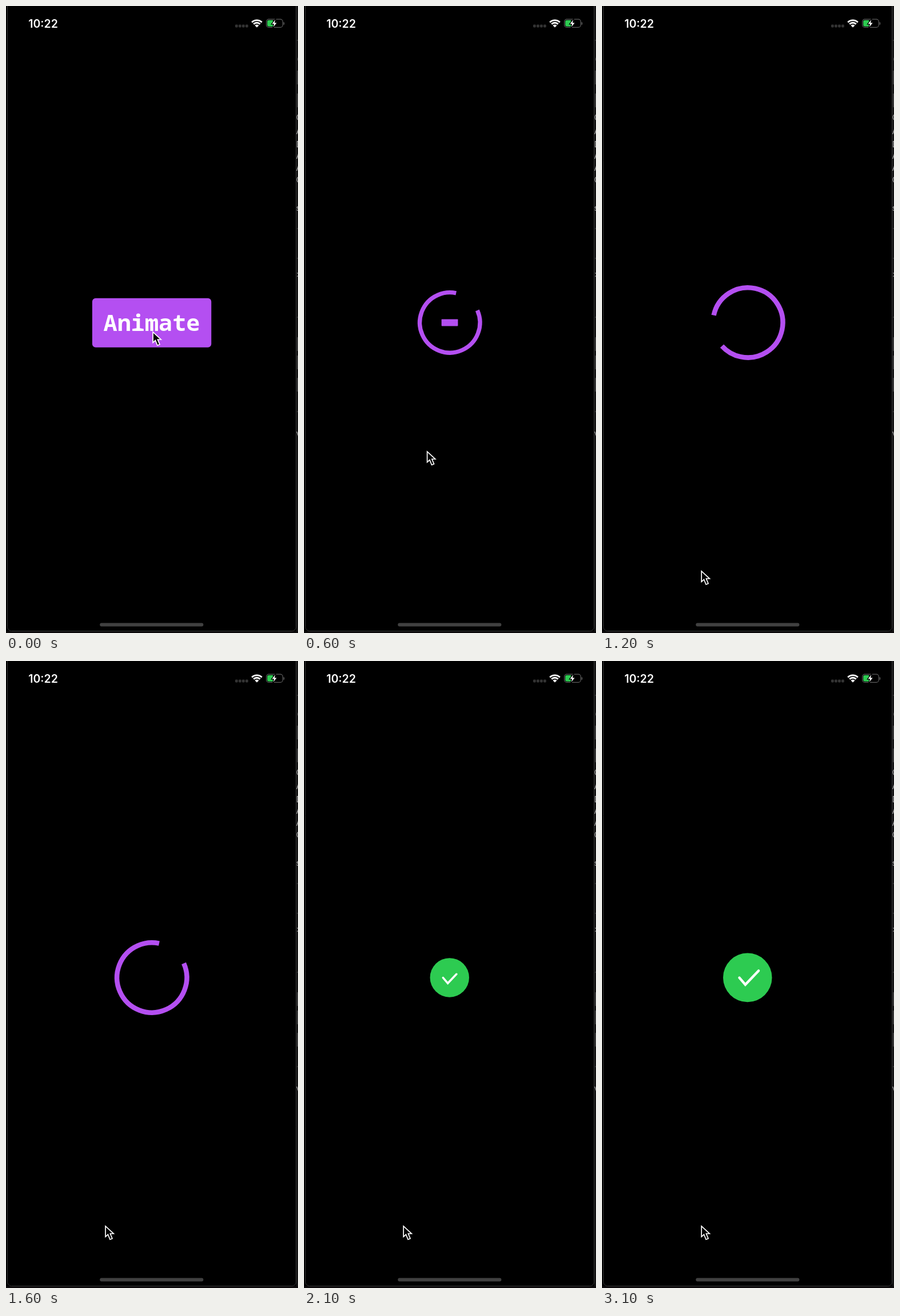
Recreate the animation shown at these times as an HTML page with a canvas. Size 511 by 1096 pixels, loop 3200 ms.

```html
<!DOCTYPE html>
<html lang="en">
<head>
<meta charset="utf-8">
<title>Animated button</title>
<style>
  html, body { margin: 0; width: 100%; height: 100%; overflow: hidden; background: #000; }
  canvas { display: block; }
</style>
</head>
<body>
<canvas id="stage"></canvas>
<script>
const W = 511, H = 1096, LOOP = 3200, TICK = 100;
const TAP = 352, DONE = 1880;
const CX = 255, CY = 553.4;
const PURPLE = '#b44ff1', GREEN = '#2dcb51';

const canvas = document.getElementById('stage');
const dpr = window.devicePixelRatio || 1;
canvas.width = W * dpr;
canvas.height = H * dpr;
canvas.style.width = W + 'px';
canvas.style.height = H + 'px';
const ctx = canvas.getContext('2d');

const clamp = v => Math.max(0, Math.min(1, v));

// Damped spring from 0 to 1 with a slight overshoot.
function spring(ms) {
  if (ms <= 0) return 0;
  const t = ms / 1000, omega = 2 * Math.PI / 0.55, zeta = 0.825;
  const decay = zeta * omega, wd = omega * Math.sqrt(1 - zeta * zeta);
  return 1 - Math.exp(-decay * t) * (Math.cos(wd * t) + decay / wd * Math.sin(wd * t));
}

function roundBox(x, y, w, h, r, fill) {
  ctx.beginPath();
  ctx.roundRect(x, y, w, h, r);
  if (fill) { ctx.fillStyle = fill; ctx.fill(); }
}

function trace(points, close) {
  ctx.beginPath();
  points.forEach(([x, y]) => ctx.lineTo(x, y));
  if (close) ctx.closePath();
}

function scaled(scale, draw) {
  if (scale < 0.003) return;
  ctx.save();
  ctx.translate(CX, CY);
  ctx.scale(scale, scale);
  draw();
  ctx.restore();
}

function drawSideWindow() {
  ctx.fillStyle = '#141414';
  ctx.fillRect(508, 0, 3, H);
  ctx.fillStyle = '#3a3a3a';
  for (const y of [113, 153, 579, 611, 650]) ctx.fillRect(509, y, 2, 24);
  ctx.fillStyle = '#303030';
  for (const y of [59, 388, 440, 543, 708]) ctx.fillRect(509, y, 2, 2);
  ctx.font = '14px Inter, sans-serif';
  ctx.textBaseline = 'alphabetic';
  ctx.textAlign = 'left';
  ctx.fillStyle = '#a8a8a8';
  ctx.fillText('(', 509, 97);
  const marks = [['C', 200], ['A', 224], ['D', 247], ['A', 267],
                 ['A', 288], ['C', 309], ['s', 358], ['>', 474], ['v', 752]];
  for (const [ch, y] of marks) ctx.fillText(ch, 507.7, y);
}

function drawPhone() {
  ctx.fillStyle = '#000';
  ctx.fillRect(0, 0, W, H);
  drawSideWindow();
  ctx.fillStyle = '#0d0b0c';
  ctx.fillRect(0, 1093, W, 3);
  roundBox(2.5, -20, 505, 1112.5, 7, '#000');
  ctx.strokeStyle = '#343434';
  ctx.lineWidth = 1;
  ctx.stroke();
  roundBox(164.2, 1078.6, 181.2, 5.8, 2.9, '#414141');
}

function drawWifi() {
  const x = 439, y = 37.5, half = Math.PI * 0.245;
  const from = -Math.PI / 2 - half, to = -Math.PI / 2 + half;
  ctx.strokeStyle = ctx.fillStyle = '#fff';
  ctx.lineWidth = 2.9;
  for (const r of [8.2, 12.6]) {
    ctx.beginPath();
    ctx.arc(x, y, r, from, to);
    ctx.stroke();
  }
  ctx.beginPath();
  ctx.moveTo(x, y);
  ctx.arc(x, y, 5, from, to);
  ctx.fill();
}

function drawBattery() {
  roundBox(455.7, 23.2, 28.6, 14.2, 4.2);
  ctx.strokeStyle = '#5c5c5c';
  ctx.lineWidth = 1.2;
  ctx.stroke();
  roundBox(457.2, 24.8, 10, 11, [2.8, 0, 0, 2.8], GREEN);
  roundBox(485.6, 28, 1.6, 5, [0, 1.6, 1.6, 0], '#5c5c5c');
  trace([[471.2, 24], [465.6, 31.2], [469.2, 31.2], [467.8, 36.8], [473.6, 29.4], [469.9, 29.4]], true);
  ctx.strokeStyle = '#000';
  ctx.lineWidth = 2.4;
  ctx.stroke();
  ctx.fillStyle = '#fff';
  ctx.fill();
}

function drawStatus() {
  ctx.fillStyle = '#fff';
  ctx.font = '600 19.5px Inter, sans-serif';
  ctx.textAlign = 'left';
  ctx.textBaseline = 'alphabetic';
  ctx.fillText('10:22', 39.2, 37.5);
  for (let i = 0; i < 4; i++) roundBox(401 + i * 6, 32.6, 4.8, 4.8, 1.4, '#343434');
  drawWifi();
  drawBattery();
}

function drawButton(gone) {
  scaled(1 - gone, () => {
    roundBox(-104.1, -42.6, 208.4, 86, 6, PURPLE);
    ctx.globalAlpha = clamp(1 - 1.7 * gone);
    ctx.fillStyle = '#fff';
    ctx.font = '600 40.2px "Noto Sans Mono", monospace';
    ctx.textAlign = 'center';
    ctx.textBaseline = 'alphabetic';
    ctx.fillText('Animate', 0, 14.8);
  });
}

function drawRing(t) {
  const size = clamp(spring(t - TAP)) - spring(t - DONE);
  scaled(size, () => {
    const start = (48 + 0.36 * (t - 800)) * Math.PI / 180;
    ctx.beginPath();
    ctx.arc(0.3, 0, 61.1, start, start + Math.PI * 1.7);
    ctx.strokeStyle = PURPLE;
    ctx.lineWidth = 8.5;
    ctx.stroke();
  });
}

function drawCheck(shown) {
  scaled(shown, () => {
    ctx.beginPath();
    ctx.arc(-0.3, 0, 42.8, 0, Math.PI * 2);
    ctx.fillStyle = GREEN;
    ctx.fill();
    trace([[-14.6, 0.2], [-4.2, 12.4], [19, -12]]);
    const length = 49.7;
    ctx.setLineDash([length * clamp(shown * 1.1), 100]);
    ctx.strokeStyle = '#fff';
    ctx.lineWidth = 4.4;
    ctx.lineCap = 'round';
    ctx.stroke();
  });
}

function drawCursor(t) {
  const p = clamp((t - 450) / 300), move = p * p * (3 - 2 * p);
  ctx.save();
  ctx.translate(256 - 83 * move, 568 + 418 * move);
  trace([[1.1, 2], [1.1, 20.4], [5.4, 16.5], [9, 25.2], [13, 23.5], [9.4, 15], [15.2, 15]], true);
  ctx.fillStyle = '#000';
  ctx.fill();
  ctx.strokeStyle = '#fff';
  ctx.lineWidth = 1.7;
  ctx.stroke();
  ctx.restore();
}

function draw(t) {
  ctx.setTransform(dpr, 0, 0, dpr, 0, 0);
  drawPhone();
  drawStatus();
  drawRing(t);
  drawButton(spring(t - TAP));
  drawCheck(spring(t - DONE));
  drawCursor(t);
}

const begin = performance.now();
function frame() {
  const t = (performance.now() - begin) % LOOP;
  draw(Math.floor(t / TICK) * TICK);
  requestAnimationFrame(frame);
}
frame();
</script>
</body>
</html>
```
